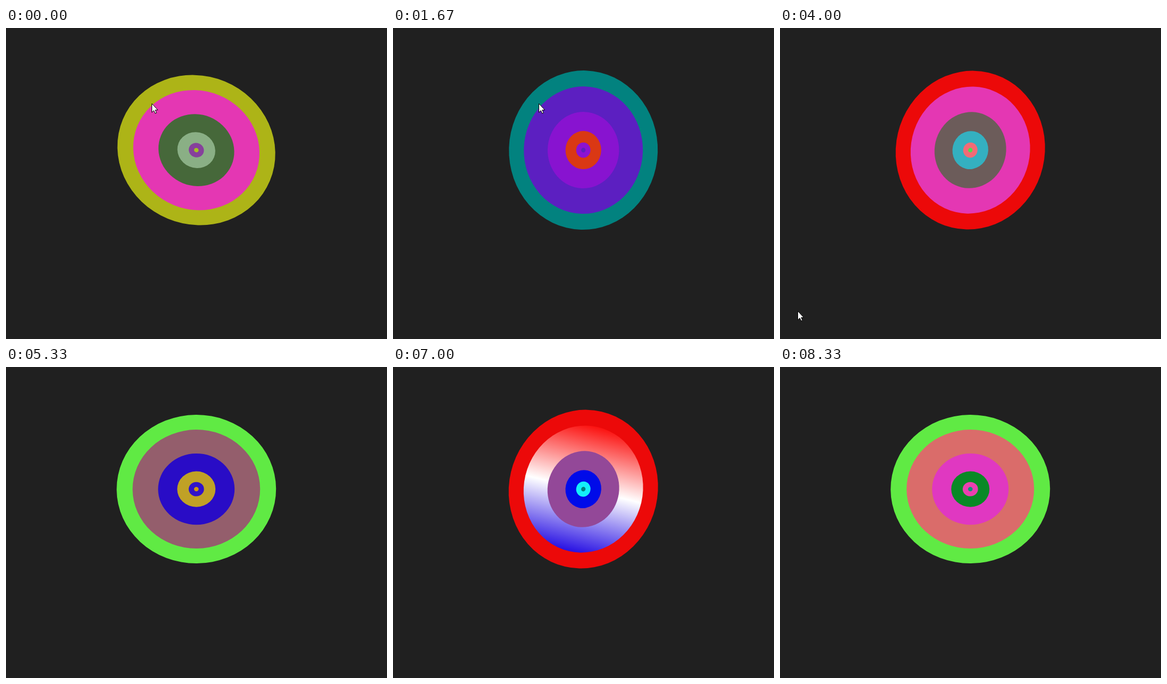
These frames come from a looping animation (717 by 586 pixels, 8390 ms). An HTML page with a canvas:

```html
<!DOCTYPE html>
<html lang="en">
<head>
<meta charset="utf-8">
<title>Spinning rings</title>
<style>
  html, body { margin: 0; width: 100%; height: 100%; overflow: hidden; background: #202020; }
  canvas { display: block; }
</style>
</head>
<body>
<canvas id="stage" width="717" height="586"></canvas>
<script>
const ctx = document.getElementById('stage').getContext('2d');
const LOOP = 8390, STEP = 200 / 3;

// Keyframes are evenly spaced unless "at" gives their percentages.
const ring = (size, period, start, colors, at) => {
  const keys = colors.split(' ').map(hex => {
    const n = parseInt(hex, 16);
    return [n >> 16, n >> 8 & 255, n & 255];
  });
  at = at || keys.map((_, i) => 100 * i / (keys.length - 1));
  return { size, period, start, keys, at };
};

const outer = ring(1, 3, 2.335, '60ea44 acb617 ff0000 008080 60ea44', [0, 20, 50, 75, 100]);
const turn = [0, 22, 90, 270, 360];
const flag = ring(0.8, 4, 1.335, '6d0ece ffffff ee00ff da6c6a 945e6c');
const inner = [
  ring(0.48, 5, 1.7, '90469a b05a88 e435c5 6c5c5a 46683a 2604d2 8c14d0', [0, 25, 33, 46, 66, 73, 100]),
  ring(0.24, 5, 1.7, '0000ff 008004 45c0ff d69c00 da3315'),
  ring(0.096, 5, 1.7, '00ffff e937bc f47d5f 0e00dc 9214d0'),
  ring(0.029, 5, 1.7, '008080 008080 69fa3c e48408 561bc7')
];

// Pointer path: time, x, y
const path = [
  [0, 274, 142], [2270, 274, 142], [2600, 107, 358], [2800, 72, 436],
  [3490, 72, 436], [3970, 33, 529], [4460, 30, 592]
];
const arrow = new Path2D('M0 0V16.5L3.8 13L6.3 18.5L8.8 17.5L6.4 12H11.2Z');

const mix = (a, b, p) => a + (b - a) * p;
const wrap = (v, n) => ((v % n) + n) % n;
const rgba = (c, a = 1) => `rgba(${c.map(Math.round).join(',')},${a})`;

// cubic-bezier(.42, 0, 1, 1)
function easeIn(x) {
  let lo = 0, hi = 1;
  for (let i = 0; i < 24; i++) {
    const s = (lo + hi) / 2, r = 1 - s;
    if (1.26 * r * r * s + 3 * r * s * s + s * s * s < x) lo = s; else hi = s;
  }
  return lo * lo * (3 - 2 * lo);
}

function segment({ period, start, at }, sec) {
  const u = 100 * wrap(sec - start, period) / period;
  let i = 0;
  while (i < at.length - 2 && u >= at[i + 1]) i++;
  return { i, p: easeIn((u - at[i]) / (at[i + 1] - at[i])) };
}

function keyColor({ keys }, { i, p }) {
  return rgba(keys[i].map((v, n) => mix(v, keys[i + 1][n], p)));
}

function disc(size, fill) {
  ctx.beginPath();
  ctx.ellipse(0, 0, 150 * size, 140 * size, 0, 0, Math.PI * 2);
  ctx.fillStyle = fill;
  ctx.fill();
}

// The second key is a gradient over a clear ground; it switches halfway.
function flagFill(seg) {
  const { i, p } = seg;
  if ((i === 0 && p >= 0.5) || (i === 1 && p < 0.53)) {
    const g = ctx.createLinearGradient(-124, 0, 124, 0);
    ['#fb0a08', '#fff', '#2008e2'].forEach((c, n) => g.addColorStop(n / 2, c));
    return g;
  }
  if (i === 0) return rgba(flag.keys[0], 1 - p);
  if (i === 1) return rgba(flag.keys[2], p);
  return keyColor(flag, seg);
}

function drawRings(sec) {
  const seg = segment(outer, sec);
  ctx.save();
  ctx.translate(358.2, 230.1);
  ctx.rotate(mix(turn[seg.i], turn[seg.i + 1], seg.p) * Math.PI / 180);
  disc(outer.size, keyColor(outer, seg));
  disc(flag.size, flagFill(segment(flag, sec)));
  for (const r of inner) disc(r.size, keyColor(r, segment(r, sec)));
  ctx.restore();
}

function drawPointer(ms) {
  const i = path.findIndex(k => k[0] > ms);
  if (i < 1) return;
  const a = path[i - 1], b = path[i], p = (ms - a[0]) / (b[0] - a[0]);
  ctx.save();
  ctx.translate(Math.round(mix(a[1], b[1], p)) + 0.5, Math.round(mix(a[2], b[2], p)) + 0.5);
  ctx.fillStyle = '#fff';
  ctx.fill(arrow);
  ctx.strokeStyle = '#000';
  ctx.stroke(arrow);
  ctx.restore();
}

function draw(now) {
  const ms = Math.floor((wrap(now, LOOP) + 3.4) / STEP) * STEP;
  ctx.fillStyle = '#202020';
  ctx.fillRect(0, 0, 717, 586);
  drawRings(ms / 1000);
  drawPointer(ms);
}

const begin = performance.now();
function tick() {
  draw(performance.now() - begin);
  requestAnimationFrame(tick);
}
tick();
</script>
</body>
</html>
```
